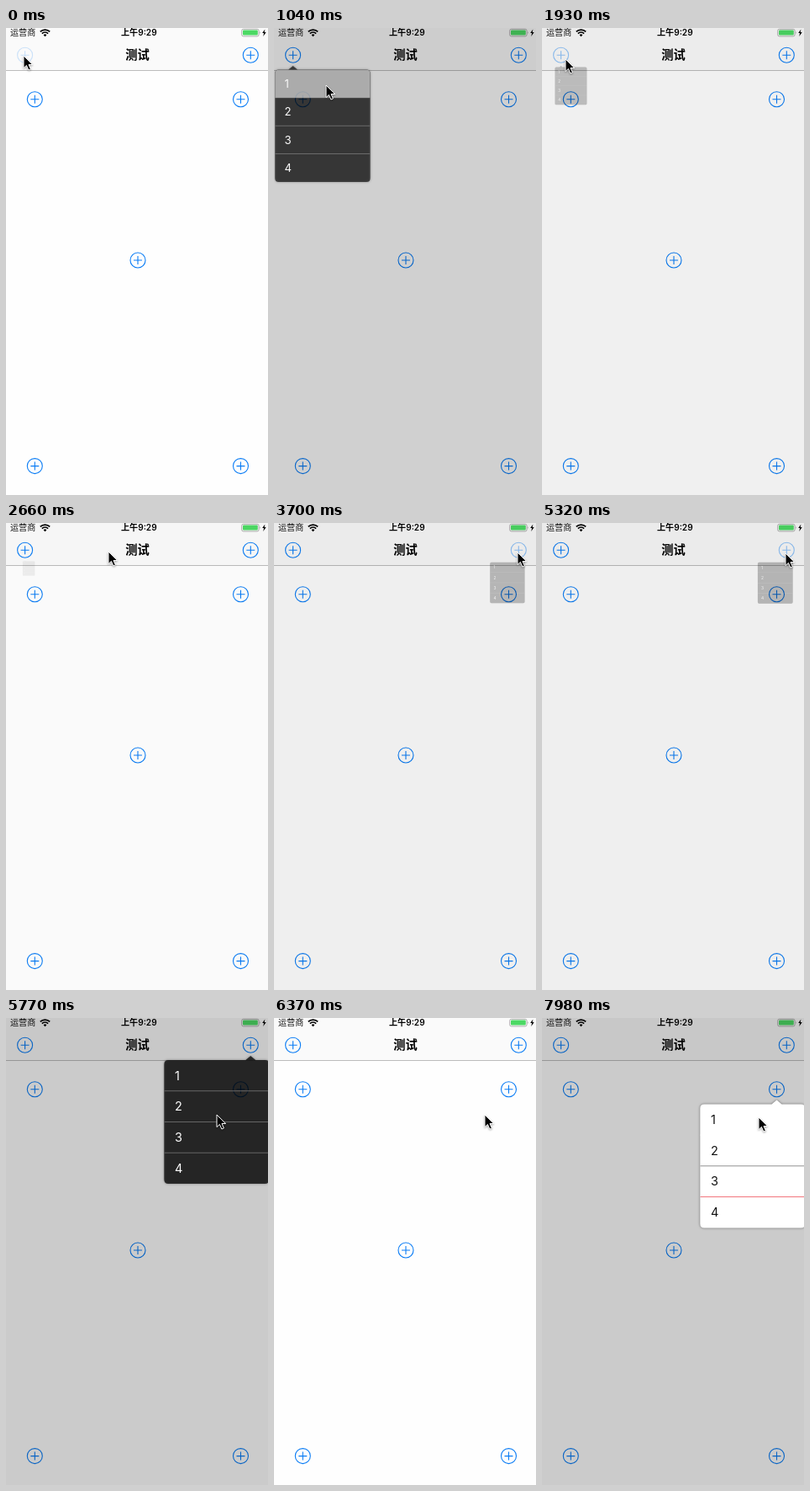
Write an HTML page that moves like this. It is 312x555 px and loops after 8 s.

```html
<!DOCTYPE html>
<html lang="zh">
<head>
<meta charset="utf-8">
<title>测试</title>
<style>
  html, body { margin: 0; width: 100%; height: 100%; overflow: hidden; background: #fff; }
  svg { display: block; width: 100vw; height: 100vh; }
  text { font-family: Inter, "Noto Sans CJK SC", "Noto Sans CJK", sans-serif; }
  .btn { fill: none; stroke: #0a7cf5; stroke-width: 1.1; }
  .panel { filter: drop-shadow(0 0 1.5px rgba(0, 0, 0, .5)); }
  .pointer { filter: drop-shadow(0 1px 1px rgba(0, 0, 0, .35)); }
</style>
</head>
<body>
<svg id="stage" viewBox="0 0 312 555" xmlns="http://www.w3.org/2000/svg">
  <rect width="312" height="555" fill="#fefefe"/>
  <rect width="312" height="50" fill="#fafafa"/>
  <rect y="50" width="312" height="1" fill="#bcbcbc"/>
  <text x="5" y="9.3" font-size="10.1" fill="#111">运营商</text>
  <g fill="none" stroke="#000" stroke-width="1.8">
    <path d="M40.8 4.4a8.2 8.2 0 0 1 11.4 0"/>
    <path d="M42.9 6.6a5.2 5.2 0 0 1 7.2 0"/>
    <path d="M46.5 10.2l-1.9-2a2.7 2.7 0 0 1 3.8 0z" fill="#000" stroke="none"/>
  </g>
  <text x="158.3" y="9.3" font-size="10.1" font-weight="600" text-anchor="middle">上午9:29</text>
  <rect x="280.7" y="1.3" width="20.4" height="8.6" rx="2" fill="none" stroke="#9a9a9a" stroke-width=".8"/>
  <rect x="282" y="2.6" width="17.8" height="6" rx="1" fill="#4cd964"/>
  <path d="M302 4.1q1.4 1.5 0 3z" fill="#9a9a9a"/>
  <path d="M308.4 1.6l-3.2 4.5h1.9l-.8 3.8 3.4-4.8h-2z"/>
  <text x="156.5" y="37.3" font-size="14.3" font-weight="700" text-anchor="middle">测试</text>
  <g id="buttons"></g>
  <rect id="dim" width="312" height="555" opacity="0"/>
  <g id="menus"></g>
  <path id="pointer" class="pointer" d="M0 0v14.6l3.4-3.2 2.5 5.6 2.5-1.1-2.4-5.4h4.7z"
        stroke="#fff" stroke-width="1" stroke-linejoin="round"/>
</svg>
<script>
const LOOP = 8000, STEP = 147.6, MOVE = 250, ROW = 36.75, WIDTH = 125;
const $ = id => document.getElementById(id);
const clamp = v => Math.max(0, Math.min(1, v));
const ease = v => { const u = clamp(v); return u * u * (3 - 2 * u); };

function add(parent, tag, attrs, text) {
  const el = document.createElementNS("http://www.w3.org/2000/svg", tag);
  for (const k in attrs) el.setAttribute(k, attrs[k]);
  if (text) el.textContent = text;
  return parent.appendChild(el);
}

const buttons = [[22.6, 32.2], [291.3, 32.2], [34.3, 84.8], [279.5, 84.8],
  [157, 276], [34.3, 520.6], [279.5, 520.6]].map(([x, y]) => add($("buttons"), "path", {
  class: "btn",
  d: `M${x - 9} ${y}a9 9 0 1 1 18 0a9 9 0 1 1 -18 0M${x - 5} ${y}h10M${x} ${y - 5}v10`
}));

const dark = { fill: "#000", alpha: .72, ink: "#fff", lines: ["#6c6c6c", "#6c6c6c", "#6c6c6c"] };
const light = { fill: "#fff", alpha: 1, ink: "#111", lines: ["#fff", "#858585", "#f0646c"] };

// pick: index of the row tapped to close the menu
const menus = [
  { btn: 0, tip: [22.6, 45], left: -1, open: 60, close: 985, pick: 0, skin: dark },
  { btn: 0, tip: [22.6, 45], left: -1, open: 1834, close: 2447, skin: dark },
  { btn: 1, tip: [291.3, 45], left: 188.3, open: 3600, close: 4527, pick: 0, skin: dark },
  { btn: 1, tip: [291.3, 45], left: 188.3, open: 5223, close: 6089, pick: 1, skin: dark },
  { btn: 3, tip: [279.5, 97.4], left: 188.3, open: 7290, close: Infinity, skin: light }
];

function buildMenu(m, i) {
  const { skin, left } = m, [tx, ty] = m.tip, top = ty + 5, h = ROW * 4, r = 5;
  m.el = add($("menus"), "g", {});
  const shape = `M${left + r} ${top}H${tx - 6}L${tx} ${ty}L${tx + 6} ${top}H${left + WIDTH - r}` +
    `q${r} 0 ${r} ${r}v${h - 2 * r}q0 ${r} ${-r} ${r}H${left + r}` +
    `q${-r} 0 ${-r} ${-r}V${top + r}q0 ${-r} ${r} ${-r}z`;
  add(m.el, "path", { class: "panel", d: shape, fill: skin.fill, "fill-opacity": skin.alpha });
  const clip = add(m.el, "clipPath", { id: "clip" + i });
  add(clip, "rect", { x: left, y: top, width: WIDTH, height: h, rx: r });
  const body = add(m.el, "g", { "clip-path": `url(#clip${i})` });
  skin.lines.forEach((c, k) =>
    add(body, "rect", { x: left, y: top + ROW * (k + 1) - .5, width: WIDTH, height: .9, fill: c }));
  if (m.pick !== undefined)
    m.mark = add(body, "rect", { x: left, y: top + ROW * m.pick, width: WIDTH, height: ROW, fill: "#a7a7a7" });
  for (let k = 0; k < 4; k++)
    add(body, "text", { x: left + 12.6, y: top + ROW * (k + .5) + 5.2, "font-size": 14.5, fill: skin.ink }, k + 1);
}
menus.forEach(buildMenu);

// [step, x, y]
const path = [[0, 21, 33], [2, 21, 33], [5, 62, 68], [8, 62, 68], [11, 28, 37], [13, 28, 37],
  [15, 122, 34], [18, 122, 34], [23, 290, 35], [26, 290, 35], [28, 264, 75], [32, 264, 75],
  [34, 290, 36], [36, 290, 36], [38, 254, 108], [39, 251, 115], [43, 251, 115], [48, 278, 86],
  [50, 278, 86], [51, 273, 86], [53, 273, 86], [54, 258, 118]];

function pointerAt(n) {
  const i = path.findIndex(k => k[0] >= n);
  if (i < 1) return path[i < 0 ? path.length - 1 : 0].slice(1);
  const a = path[i - 1], b = path[i], u = ease((n - a[0]) / (b[0] - a[0]));
  return [a[1] + (b[1] - a[1]) * u, a[2] + (b[2] - a[2]) * u];
}

function draw(time) {
  const n = Math.floor(time / STEP), t = n * STEP;
  let shade = 0;
  buttons.forEach(b => b.setAttribute("opacity", 1));
  for (const m of menus) {
    const closing = t >= m.close;
    const p = ease((t - m.open) / MOVE) * (1 - ease((t - m.close) / MOVE));
    const s = .05 + .95 * p, [x, y] = m.tip;
    shade = Math.max(shade, p);
    m.el.setAttribute("display", p > 0 ? "inline" : "none");
    m.el.setAttribute("opacity", p);
    m.el.setAttribute("transform", `translate(${x} ${y}) scale(${s}) translate(${-x} ${-y})`);
    if (m.mark) m.mark.setAttribute("display", closing ? "inline" : "none");
    const since = t - m.open;
    if (since > -MOVE && since < 290)
      buttons[m.btn].setAttribute("opacity", .2 + .8 * clamp(since / 290));
  }
  $("dim").setAttribute("opacity", .2 * shade);
  $("pointer").setAttribute("transform", `translate(${pointerAt(n)})`);
}

const start = performance.now();
function tick() {
  draw((performance.now() - start) % LOOP);
  requestAnimationFrame(tick);
}
tick();
</script>
</body>
</html>
```
